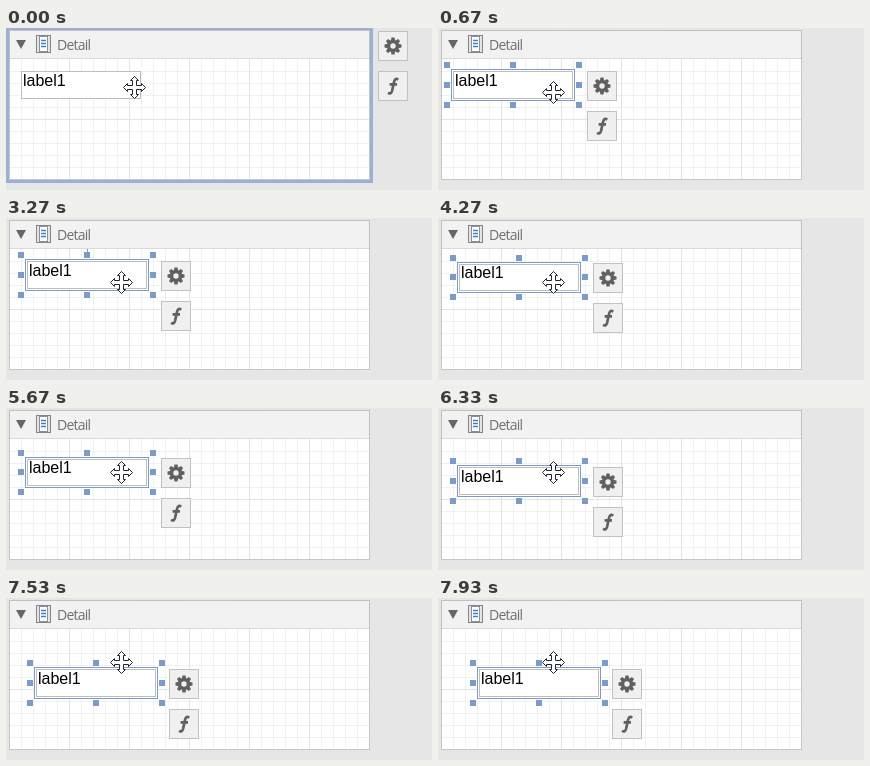
An HTML page that plays this animation: 426x162 px, repeating every 8 s.

```html
<!DOCTYPE html>
<html lang="en">
<head>
<meta charset="utf-8">
<title>Moving a label</title>
<style>
  html, body { margin: 0; width: 426px; height: 162px; overflow: hidden; background: #e6e6e6; }
  svg { display: block; }
  .title { font: 14px "Open Sans", "Noto Sans", sans-serif; letter-spacing: -.75px; fill: #707070; }
  .label { font: 16px "Liberation Sans", Arial, sans-serif; fill: #000; }
  .button rect { fill: #f0f0f0; stroke: #c2c2c2; }
  .icon { fill: #606060; }
</style>
</head>
<body>
<svg width="426" height="162" viewBox="0 0 426 162">
  <rect id="focus" width="367" height="155" fill="#9bb1d3"/>
  <rect x="3" y="2" width="361" height="150" fill="#fff"/>
  <g id="grid" fill="none" shape-rendering="crispEdges"></g>
  <rect x="3" y="2" width="361" height="28" fill="#f2f2f2"/>
  <path d="M3 30.5H364" stroke="#dadada"/>
  <rect x="3.5" y="2.5" width="360" height="149" fill="none" stroke="#8f8f8f" stroke-dasharray="1 1"/>

  <path d="M10 12H20L15 21Z" fill="#666"/>
  <g>
    <rect x="30.5" y="7.5" width="14" height="17" fill="#e4e4e4" stroke="#858585"/>
    <rect x="33.5" y="8.5" width="8" height="15" fill="#fff" stroke="#8a8f98"/>
    <path d="M35 12.5H40M35 15.5H40M35 18.5H40" stroke="#3f7fc8" stroke-width="1.5"/>
  </g>
  <text class="title" x="51" y="22">Detail</text>

  <g id="selection">
    <path id="guide" d="M75.5 31V35" stroke="#7b9bc8"/>
    <rect id="outline" x="13.5" y="41.5" width="123" fill="#fff" stroke="#7b9bc8"/>
    <g id="handles" fill="#7b9bc8"></g>
  </g>
  <g id="box">
    <rect id="frame" x="15.5" y="43.5" width="119" fill="#fff" stroke="#bdbdbd"/>
  </g>
  <text id="text" class="label" x="17" y="58">label1</text>

  <g id="buttons">
    <g class="button">
      <rect x=".5" y=".5" width="29" height="29"/>
      <g id="gear" class="icon" transform="translate(15 15)"></g>
    </g>
    <g class="button" transform="translate(0 40)">
      <rect x=".5" y=".5" width="29" height="29"/>
      <path transform="translate(15 15)" fill="none" stroke="#606060" stroke-width="2.7"
        d="M5.2 -6.3C3 -8 1.6 -6.7 1 -4L-.9 4.8C-1.5 7.3 -3 8 -5 6.9M-3.4 -1.7H4"/>
    </g>
  </g>

  <g id="cursor" fill="#fff" stroke="#23232f"></g>
</svg>
<script>
// Times below are ticks of a 15 per second clock.
const LOOP = 8000, RATE = 15 / 1000, SELECT = 10;
const $ = id => document.getElementById(id);
const place = (id, x, y) => $(id).setAttribute("transform", `translate(${x} ${y})`);
const show = (id, on) => $(id).setAttribute("visibility", on ? "inherit" : "hidden");
const up = v => Math.ceil(v - .01);
const down = v => Math.floor(v + .01);

// Progress 0..1 in equal jumps, the first at start and the last at end.
function jumps(tick, start, end, count) {
  if (tick < start) return 0;
  if (tick >= end) return 1;
  return (Math.floor((tick - start) * (count - 1) / (end - start)) + 1) / count;
}

function gridLines(gap, color) {
  let d = "";
  for (let x = 3.5 + gap; x < 363; x += gap) d += `M${x} 31V151`;
  for (let y = 31.5 + gap; y < 151; y += gap) d += `M3 ${y}H363`;
  return `<path d="${d}" stroke="${color}"/>`;
}

function build() {
  $("grid").innerHTML = gridLines(12, "#f1f1f1") + gridLines(60, "#e3e3e3");

  let teeth = "";
  for (let a = 0; a < 360; a += 45)
    teeth += `<path d="M-2.2 -5L-1.5 -8.5H1.5L2.2 -5Z" transform="rotate(${a})"/>`;
  $("gear").innerHTML = teeth +
    '<circle r="4.4" fill="none" stroke="#606060" stroke-width="3.4"/>';

  const arm = [[-2, -2], [-2, -7], [-4, -7], [0, -11], [4, -7], [2, -7]];
  const points = [0, 1, 2, 3].flatMap(turn => arm.map(([x, y]) => {
    for (let i = 0; i < turn; i++) [x, y] = [-y, x];
    return [x, y];
  }));
  $("cursor").innerHTML = `<polygon points="${points.join(" ")}"/>`;
}

// A fractional y pulls the lower edge up by one pixel.
function drawBox(x, y) {
  const shrink = up(y) - down(y);
  for (const id of ["box", "selection"]) place(id, up(x), up(y));
  place("text", up(x), down(y));
  $("outline").setAttribute("height", 31 - shrink);
  $("frame").setAttribute("height", 27 - shrink);

  let handles = "";
  for (const hx of [6, 72, 138])
    for (const hy of [34, 54 - shrink, 74 - shrink])
      if (hx !== 72 || hy !== 54 - shrink)
        handles += `<rect x="${hx}" y="${hy}" width="6" height="6"/>`;
  $("handles").innerHTML = handles;
}

function draw(t) {
  const tick = Math.floor(t * RATE + .06);
  const by = (start, end, count) => jumps(tick, start, end, count);
  const selected = tick >= SELECT;

  const x = 6 * by(22, 49, 5) + 1.5 * by(103, 103, 1) + 7 * by(111, 113, 3) + 11 * by(115, 119, 5);
  const y = 7.5 * by(58, 85, 6) + 8.5 * by(92, 95, 4) + 12 * by(97, 101, 5);
  drawBox(x, y);

  if (selected) place("buttons", 149 + down(x + .4), 43 + down(y + .4));
  else place("buttons", 372, 3);

  const reach = by(1, 3, 3);
  place("cursor", Math.round(128 - 13 * reach) + .5, Math.round(59 + 5 * reach) + .5);

  show("focus", !selected);
  show("selection", selected);
  show("guide", tick >= 22 && tick < 57);
}

function play() {
  draw(performance.now() % LOOP);
  requestAnimationFrame(play);
}

build();
play();
</script>
</body>
</html>
```
